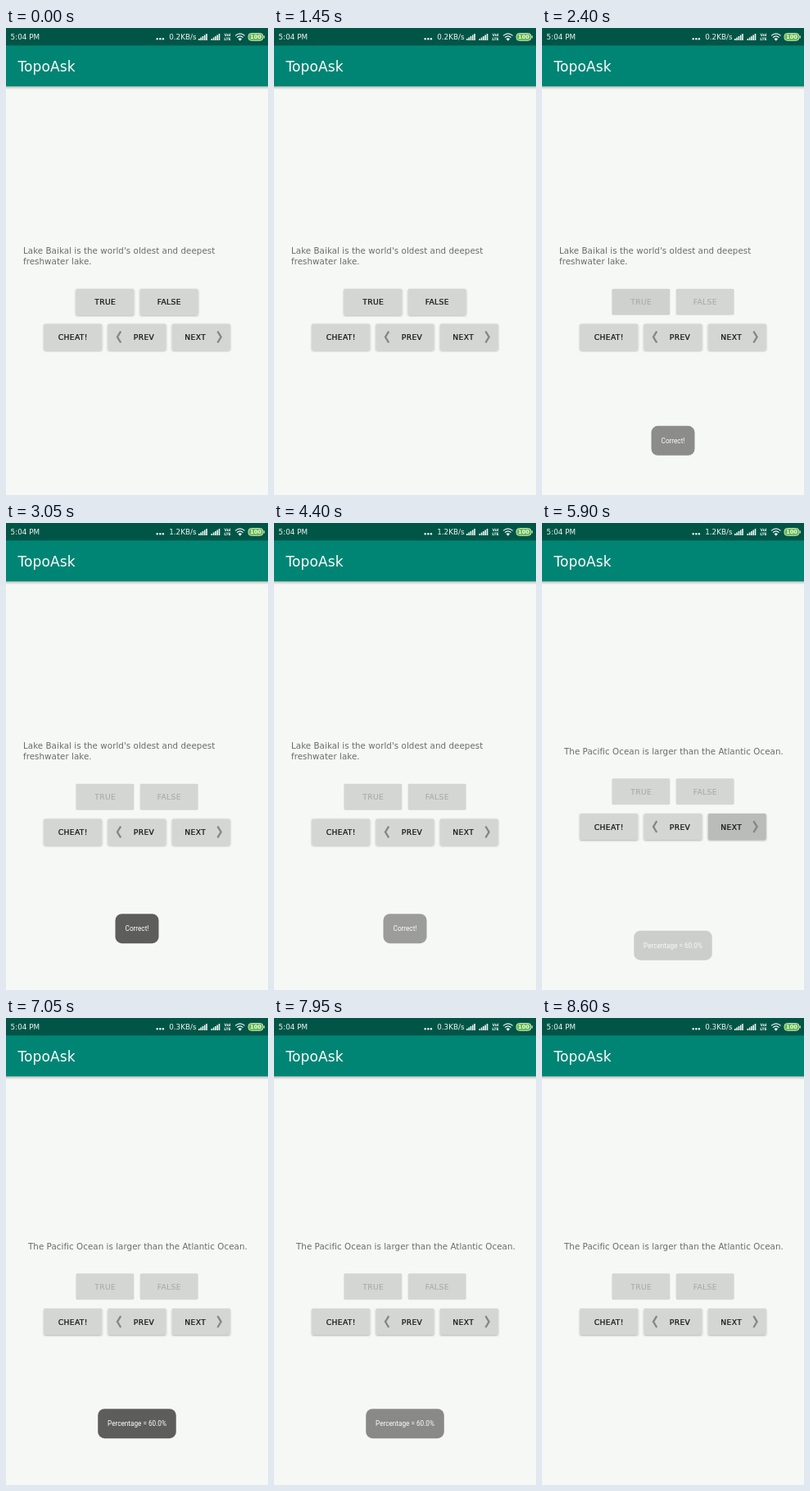
An HTML page that plays this animation: 320x569 px, repeating every 8650 ms.

```html
<!DOCTYPE html>
<html lang="en">
<head>
<meta charset="utf-8">
<title>Quiz app</title>
<style>
  html, body { margin: 0; width: 100%; height: 100%; overflow: hidden; background: #f6f8f5; }
  svg { display: block; width: 100%; height: 100%; }
  text { font-family: "DejaVu Sans", sans-serif; }
  .status text { font-size: 8.8px; fill: #f2f7f5; }
  .status .tiny { font-size: 4.6px; font-weight: bold; }
  .title { font-size: 17px; fill: #fff; letter-spacing: .1px; }
  .question { font-size: 10.3px; fill: #6a6b6a; letter-spacing: .05px; }
  .button text { font-size: 9.2px; fill: #111; stroke: #111; stroke-width: .22; text-anchor: middle; letter-spacing: .35px; }
  .button .face { fill: #d4d6d3; filter: url(#lift); }
  .button .press { fill: #000; opacity: 0; }
  .button.off .face { filter: none; }
  .button.off text { fill: #a9aba8; stroke: #a9aba8; stroke-width: .1; }
  .chevron { fill: none; stroke: #858684; stroke-width: 2.3; }
  .toast rect { fill: #5d5e5c; }
  .toast text { font: 8.2px Roboto, sans-serif; fill: #fff; text-anchor: middle; }
</style>
</head>
<body>
<svg viewBox="0 0 320 569" preserveAspectRatio="none">
  <defs>
    <filter id="lift" x="-10%" y="-20%" width="120%" height="150%">
      <feDropShadow dx="0" dy=".9" stdDeviation=".8" flood-color="#000" flood-opacity=".3"/>
    </filter>
    <linearGradient id="shade" x2="0" y2="1">
      <stop stop-color="#000" stop-opacity=".24"/>
      <stop offset="1" stop-color="#000" stop-opacity="0"/>
    </linearGradient>
  </defs>
  <rect width="320" height="569" fill="#f6f8f5"/>
  <rect y="71" width="320" height="4" fill="url(#shade)"/>
  <rect width="320" height="71.1" fill="#008574"/>
  <rect width="320" height="21.33" fill="#005547"/>

  <g class="status">
    <text x="5.6" y="14">5:04 PM</text>
    <g fill="#f2f7f5">
      <circle cx="184.7" cy="13.3" r="1.2"/>
      <circle cx="188.3" cy="13.3" r="1.2"/>
      <circle cx="191.9" cy="13.3" r="1.2"/>
    </g>
    <text id="speed" x="232.5" y="14" text-anchor="end">0.2KB/s</text>
    <g id="signal" fill="#f2f7f5"></g>
    <text class="tiny" x="270.5" y="9.8" text-anchor="middle">VoI</text>
    <text class="tiny" x="270.5" y="15" text-anchor="middle">LTE</text>
    <g fill="none" stroke="#f2f7f5" stroke-width="1.2">
      <path d="M280 9.4Q285.8 4.2 291.6 9.4M282 11.6Q285.8 8.2 289.6 11.6"/>
      <path d="M283.5 13.2Q285.8 11.2 288.1 13.2L285.8 15.7Z" fill="#f2f7f5" stroke="none"/>
    </g>
    <rect x="296" y="6.5" width="18" height="8.8" rx="3.6" fill="#63b946" stroke="#dcecd6" stroke-width=".9"/>
    <rect x="314.6" y="9.3" width="1.2" height="3.2" rx=".5" fill="#dcecd6"/>
    <text x="305" y="13.3" text-anchor="middle" style="font-size:6.6px;font-weight:bold">100</text>
  </g>
  <text class="title" x="14.5" y="52.7">TopoAsk</text>

  <g id="first" class="question">
    <text x="21" y="275.3">Lake Baikal is the world's oldest and deepest</text>
    <text x="21" y="287.8">freshwater lake.</text>
  </g>
  <g id="second" class="question">
    <text x="27" y="281.6">The Pacific Ocean is larger than the Atlantic Ocean.</text>
  </g>
  <g id="buttons"></g>
  <g id="toasts"></g>
</svg>
<script>
const LOOP = 8650, ANSWER = 2280, ADVANCE = 5850;
const TOASTS = [
  { text: "Correct!", width: 53, show: 2290, hide: 4235 },
  { text: "Percentage = 60.0%", width: 95.5, show: 5865, hide: 7835 }
];
const $ = id => document.getElementById(id);

function add(parent, tag, attrs, text = "") {
  const el = document.createElementNS("http://www.w3.org/2000/svg", tag);
  for (const key in attrs) el.setAttribute(key, attrs[key]);
  el.textContent = text;
  return parent.appendChild(el);
}

function addButton(label, x, y, textX) {
  const g = add($("buttons"), "g", { class: "button" });
  const box = { x, y, width: 71.1, height: 32, rx: 1.7 };
  add(g, "rect", { ...box, class: "face" });
  const press = add(g, "rect", { ...box, class: "press" });
  add(g, "text", { x: textX, y: y + 19.6 }, label);
  return { g, press };
}

const yes = addButton("TRUE", 85.3, 317.7, 121.2);
const no = addButton("FALSE", 163.6, 317.7, 199.3);
addButton("CHEAT!", 46.2, 360.4, 81.8);
const prev = addButton("PREV", 124.4, 360.4, 168.5);
const next = addButton("NEXT", 202.7, 360.4, 231.2);
add(prev.g, "path", { class: "chevron", d: "M140.2 369.6L136 376.5L140.2 383.4" });
add(next.g, "path", { class: "chevron", d: "M258.4 369.6L262.6 376.5L258.4 383.4" });

for (const left of [235, 250.5])
  for (let i = 0; i < 5; i++)
    add($("signal"), "rect", { x: left + i * 2.3, y: 13 - i * 1.5, width: 1.6, height: 2 + i * 1.5 });

for (const toast of TOASTS) {
  toast.g = add($("toasts"), "g", { class: "toast" });
  add(toast.g, "rect", { x: 160 - toast.width / 2, y: 476.2, width: toast.width, height: 36, rx: 8 });
  add(toast.g, "text", { x: 160, y: 497.3 }, toast.text);
}

const ramp = (t, start, length) => Math.min(1, Math.max(0, (t - start) / length));
const easeOut = p => 1 - (1 - p) ** 2;
const show = (el, on) => el.style.display = on ? "" : "none";

function draw(t) {
  const advanced = t >= ADVANCE;
  show($("first"), !advanced);
  show($("second"), advanced);
  $("buttons").setAttribute("transform", `translate(0 ${advanced ? -6.4 : 0})`);

  for (const { g } of [yes, no]) g.classList.toggle("off", t >= ANSWER);
  yes.press.style.opacity = .12 * (ramp(t, 2140, 60) - ramp(t, ANSWER, 150));
  next.press.style.opacity = .12 * (ramp(t, 5740, 60) - ramp(t, 5940, 250));

  $("speed").textContent = t < 2500 ? "0.2KB/s" : t < 6500 ? "1.2KB/s" : "0.3KB/s";

  for (const toast of TOASTS) {
    const enter = easeOut(ramp(t, toast.show, 250));
    toast.g.style.opacity = enter * (1 - ramp(t, toast.hide, 400));
    toast.g.setAttribute("transform", `translate(0 ${28 * (1 - enter)})`);
  }
}

const begin = performance.now();
function tick() {
  draw((performance.now() - begin) % LOOP);
  requestAnimationFrame(tick);
}
tick();
</script>
</body>
</html>
```
